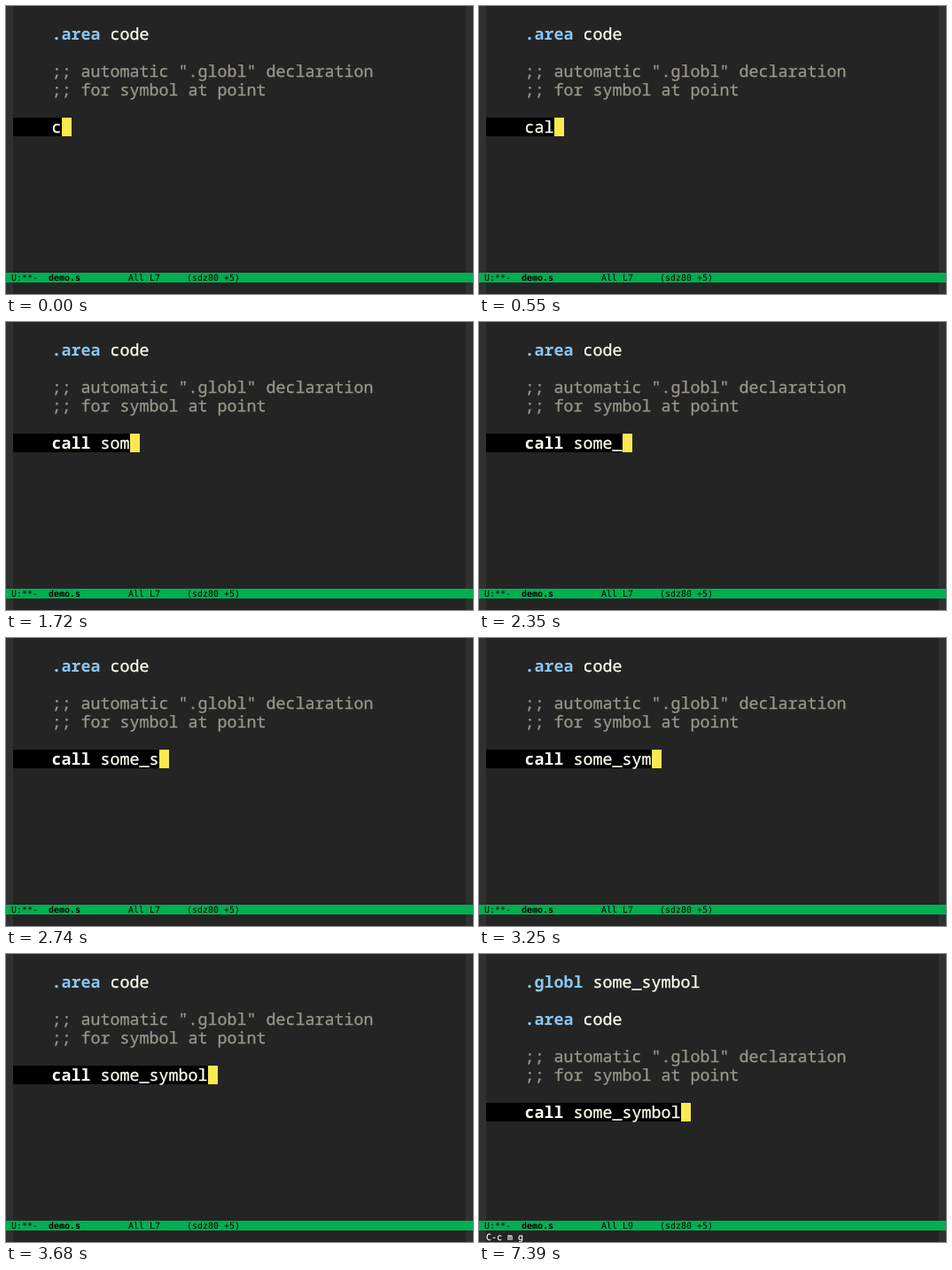
These frames come from a looping animation (527 by 325 pixels, 8 s). An HTML page:

```html
<!DOCTYPE html>
<html lang="en">
<head>
<meta charset="utf-8">
<title>Editor demo</title>
<style>
  html, body { margin: 0; width: 527px; height: 325px; overflow: hidden; background: #242424; }
  svg { display: block; }
  text { white-space: pre; text-rendering: geometricPrecision; }
  .code { font: 18.333px "Noto Sans Mono", "DejaVu Sans Mono", monospace; }
  .code text { fill: #fffff0; stroke: #fffff0; stroke-width: .3px; }
  .code .comment { fill: #99968b; stroke: #99968b; }
  .code .keyword { font-weight: bold; fill: #8ac6f2; stroke: none; }
  .code .bold { stroke: none; }
  .small { font: 9.967px "DejaVu Sans Mono", monospace; }
  .bold { font-weight: bold; }
</style>
</head>
<body>
<svg width="527" height="325" viewBox="0 0 527 325">
  <rect width="527" height="325" fill="#242424"/>
  <path d="M0 0H8V325H0ZM519 0H527V325H519Z" fill="#303030"/>
  <rect y="301" width="527" height="11" fill="#00af50"/>
  <g class="code">
    <text id="globl" x="51.5" y="38"><tspan class="keyword">.globl</tspan> some_symbol</text>
    <g id="buffer">
      <text x="51.5" y="38"><tspan class="keyword">.area</tspan> code</text>
      <text class="comment" x="51.5" y="80">;; automatic ".globl" declaration</text>
      <text class="comment" x="51.5" y="101">;; for symbol at point</text>
      <rect id="highlight" x="8" y="126" height="21" fill="#000"/>
      <rect id="cursor" y="126" width="11" height="21" fill="#fce94f"/>
      <text x="51.5" y="143"><tspan id="opcode"></tspan><tspan id="operand"></tspan></text>
    </g>
  </g>
  <g class="small">
    <text x="6" y="310">U:**-</text>
    <text class="bold" x="48" y="310">demo.s</text>
    <text x="138" y="310">All <tspan id="line"></tspan></text>
    <text x="204" y="310">(sdz80 +5)</text>
    <text id="echo" x="8" y="323" fill="#fffff0" stroke="#fffff0" stroke-width=".2">C-c m g</text>
  </g>
</svg>
<script>
  const LOOP = 8000, INSERT_AT = 7390;
  const CHAR = 11, ROW = 21, LEFT = 52;
  const PHRASE = "call some_symbol";
  // [time in ms, characters typed]
  const KEYS = [
    [0, 1], [80, 2], [550, 3], [700, 4], [1070, 5], [1360, 7], [1720, 8],
    [2030, 9], [2350, 10], [2740, 11], [3010, 12], [3250, 13], [3360, 14],
    [3470, 15], [3680, 16]
  ];
  const el = id => document.getElementById(id);
  const show = (id, on) => el(id).setAttribute("visibility", on ? "visible" : "hidden");

  function render(t) {
    const count = KEYS.filter(([at]) => at <= t).pop()[1];
    const inserted = t >= INSERT_AT;
    const x = LEFT + count * CHAR;

    el("opcode").textContent = PHRASE.slice(0, Math.min(count, 4));
    el("opcode").setAttribute("class", count >= 4 ? "bold" : "");
    el("operand").textContent = PHRASE.slice(4, count);
    el("highlight").setAttribute("width", x - 8);
    el("cursor").setAttribute("x", x);

    el("buffer").setAttribute("transform", `translate(0 ${inserted ? 2 * ROW : 0})`);
    el("line").textContent = inserted ? "L9" : "L7";
    show("globl", inserted);
    show("echo", inserted);
  }

  const start = performance.now();
  function tick() {
    render((performance.now() - start) % LOOP);
    requestAnimationFrame(tick);
  }
  tick();
</script>
</body>
</html>
```
